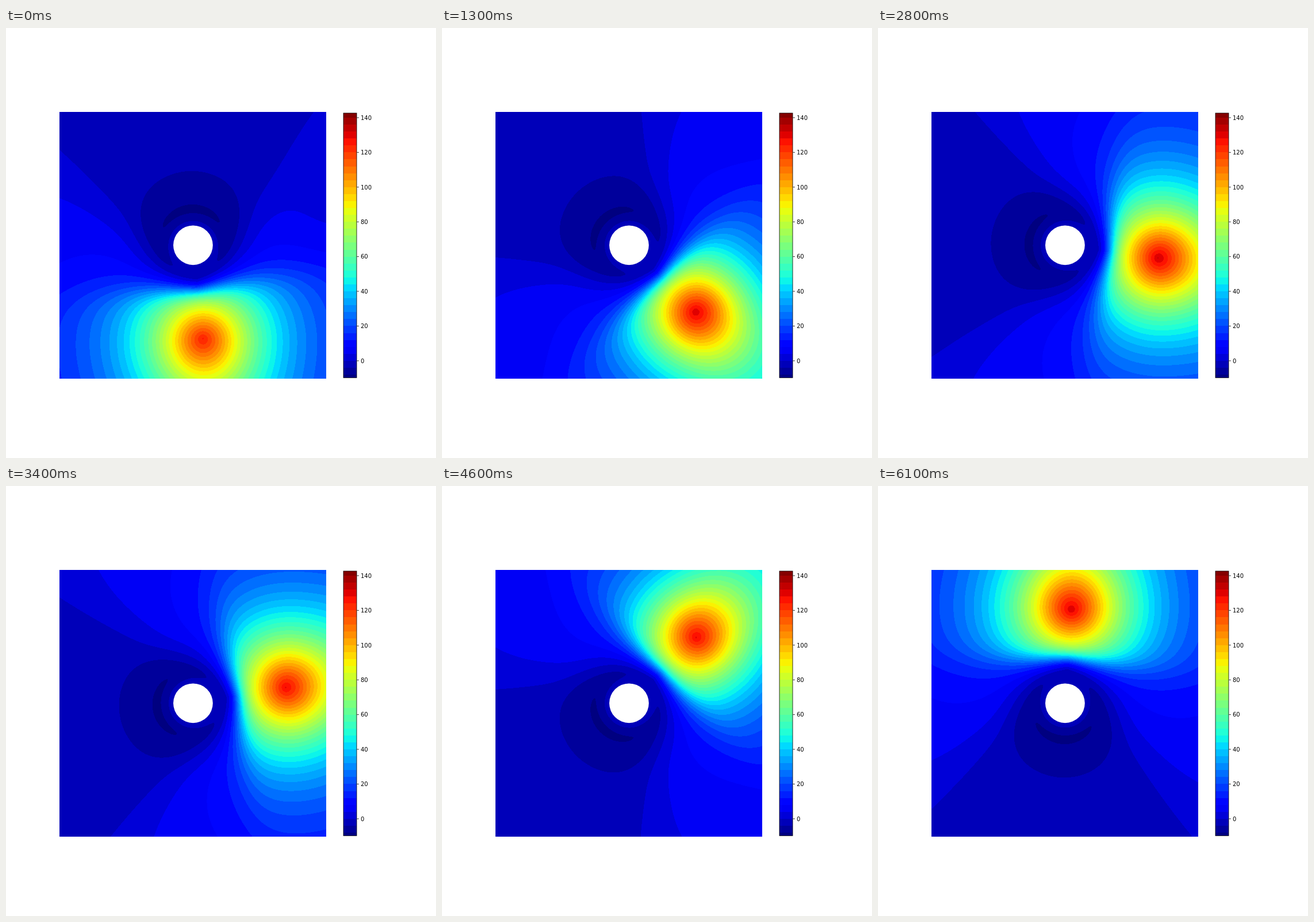
Animation of 748 by 748 pixels, one loop 6.2 s. Source, as an HTML page with a canvas:

```html
<!DOCTYPE html>
<html lang="en">
<head>
<meta charset="utf-8">
<title>Rotating contour field</title>
<style>
html, body { margin: 0; width: 100%; height: 100%; overflow: hidden; background: #fff; }
canvas, svg { position: absolute; display: block; }
canvas { left: 93px; top: 146px; }
svg { left: 0; top: 0; }
text { font: 10px "DejaVu Sans", sans-serif; }
</style>
</head>
<body>
<canvas id="field" width="464" height="464"></canvas>
<svg width="748" height="748" viewBox="0 0 748 748">
  <circle cx="325.4" cy="377.8" r="34.4" fill="#fff"/>
  <g id="bar" shape-rendering="crispEdges"></g>
  <rect x="587" y="148" width="23" height="460.5" fill="none" stroke="#000" stroke-width="0.8"/>
  <g id="ticks"></g>
</svg>
<script>
const LOOP = 6200, STEP = 100;
const LOW = -9.6, HIGH = 142.65;          // colour range
const FIRST = -12, GAP = 4, BANDS = 39;   // contour levels
const CX = 325.5, CY = 378, LEFT = 93, TOP = 146, SIZE = 464;
const PEAK_DIST = 163;

const exp = Math.exp, TAU = 2 * Math.PI;
const clamp = (x, lo, hi) => Math.max(lo, Math.min(hi, x));
const sigmoid = x => 1 / (1 + exp(-x));

// rises from x0 to x1, stays, falls from x2 to x3
const hump = (n, x0, x1, x2, x3) =>
  clamp(Math.min((n - x0) / (x1 - x0), (x3 - n) / (x3 - x2)), 0, 1);

function jet(n) {
  return [
    hump(n, .35, .66, .89, 1.11),
    hump(n, .125, .375, .64, .91),
    hump(n, -.11, .11, .34, .65)
  ].map(c => Math.round(c * 255));
}

const palette = Array.from({ length: BANDS }, (_, i) =>
  jet(clamp((FIRST + (i + .5) * GAP - LOW) / (HIGH - LOW), 0, 1)));
const packed = palette.map(([r, g, b]) => (255 << 24 | b << 16 | g << 8 | r) >>> 0);

// t in seconds; a near-steady half turn with an early sway
function pose(t) {
  const sway = 3 * Math.sin(TAU * t / 4.1) * exp(-((t / 3.6) ** 4));
  const angle = (84 - 27.9 * t - sway) * Math.PI / 180;
  return {
    ux: Math.cos(angle), uy: Math.sin(angle),
    peak: 129 - 4 * Math.cos(TAU * t / .8),
    diag: Math.sin(2 * angle) ** 2,
    lag: 3.2 * Math.max(0, 1 - t / .9)
  };
}

// a runs from the hole towards the peak, b across it
function height(a, b, s) {
  const bb = b * b, r = Math.sqrt(a * a + bb);
  if (r < 32) return 0;
  const side = Math.abs(b);

  // hill: pointed top on a broad base
  const near = Math.sqrt((a - PEAK_DIST) ** 2 + bb);
  let da = a - PEAK_DIST - 5;
  if (da > 0) da /= 1 + da / 600;
  const squeeze = 1 + .17 * s.diag * bb / (bb + 6400);
  const fall = .15 * (1 - exp(-near / 35)) + 1.02e-4 * (da * da + bb * squeeze * squeeze);
  const hill = s.peak / (1 + fall);

  // steep front before the hole, with the hill leaking round its sides
  const edge = 80 - (18 - 15 * s.diag) * bb / (bb + 10000);
  const front = sigmoid((a - edge) / (8.5 + .045 * side));
  const leak = .95 * Math.max(0, 1 - exp((28 - r) / 165))
    * sigmoid((side + .8 * a - 72) / (8 + .12 * r));
  const open = front + (1 - front) * leak;

  // dark pit behind the hole and the thin rim around it
  const pa = a * (a < 0 ? .93 : 1.4);
  const spread = (pa * pa + bb) / 10000;
  const pit = 3.3 + 5.7 * exp(-spread * spread);
  const rim = r < 80 ? 7 * exp(-(((r - 34) / 14) ** 2)) : 0;
  return hill * open - pit * (1 - open) + rim;
}

const ctx = document.getElementById("field").getContext("2d");
const image = ctx.createImageData(SIZE, SIZE);
const pixels = new Uint32Array(image.data.buffer);

function drawField(t) {
  const s = pose(t);
  for (let j = 0, k = 0; j < SIZE; j++) {
    const dy = TOP + j + .5 - CY;
    for (let i = 0; i < SIZE; i++, k++) {
      const dx = LEFT + i + .5 - CX;
      let v = height(dx * s.ux + dy * s.uy, dy * s.ux - dx * s.uy, s);
      if (s.lag && dx > 0) v -= s.lag * exp(-((dx - 236) ** 2 + (dy + 48) ** 2) / 8100);
      pixels[k] = packed[clamp(Math.floor((v - FIRST) / GAP), 0, BANDS - 1)];
    }
  }
  ctx.putImageData(image, 0, 0);
}

const barY = v => 578.9 - 3.021 * v;

function drawBar() {
  document.getElementById("bar").innerHTML = palette.map((c, i) => {
    const v = FIRST + i * GAP;
    const top = barY(Math.min(v + GAP, HIGH)), bottom = barY(Math.max(v, LOW));
    return `<rect x="587" y="${top}" width="23" height="${bottom - top}" fill="rgb(${c})"/>`;
  }).join("");
  let ticks = "";
  for (let v = 0; v <= 140; v += 20) {
    const y = barY(v);
    ticks += `<path d="M610.4 ${y}h3.5" stroke="#000" stroke-width=".8"/>` +
      `<text x="617" y="${Math.round(y + 3.7)}">${v}</text>`;
  }
  document.getElementById("ticks").innerHTML = ticks;
}

let shown = -1;
function tick() {
  const step = Math.floor(performance.now() % LOOP / STEP);
  if (step !== shown) {
    shown = step;
    drawField(step * STEP / 1000);
  }
  requestAnimationFrame(tick);
}

drawBar();
tick();
</script>
</body>
</html>
```
